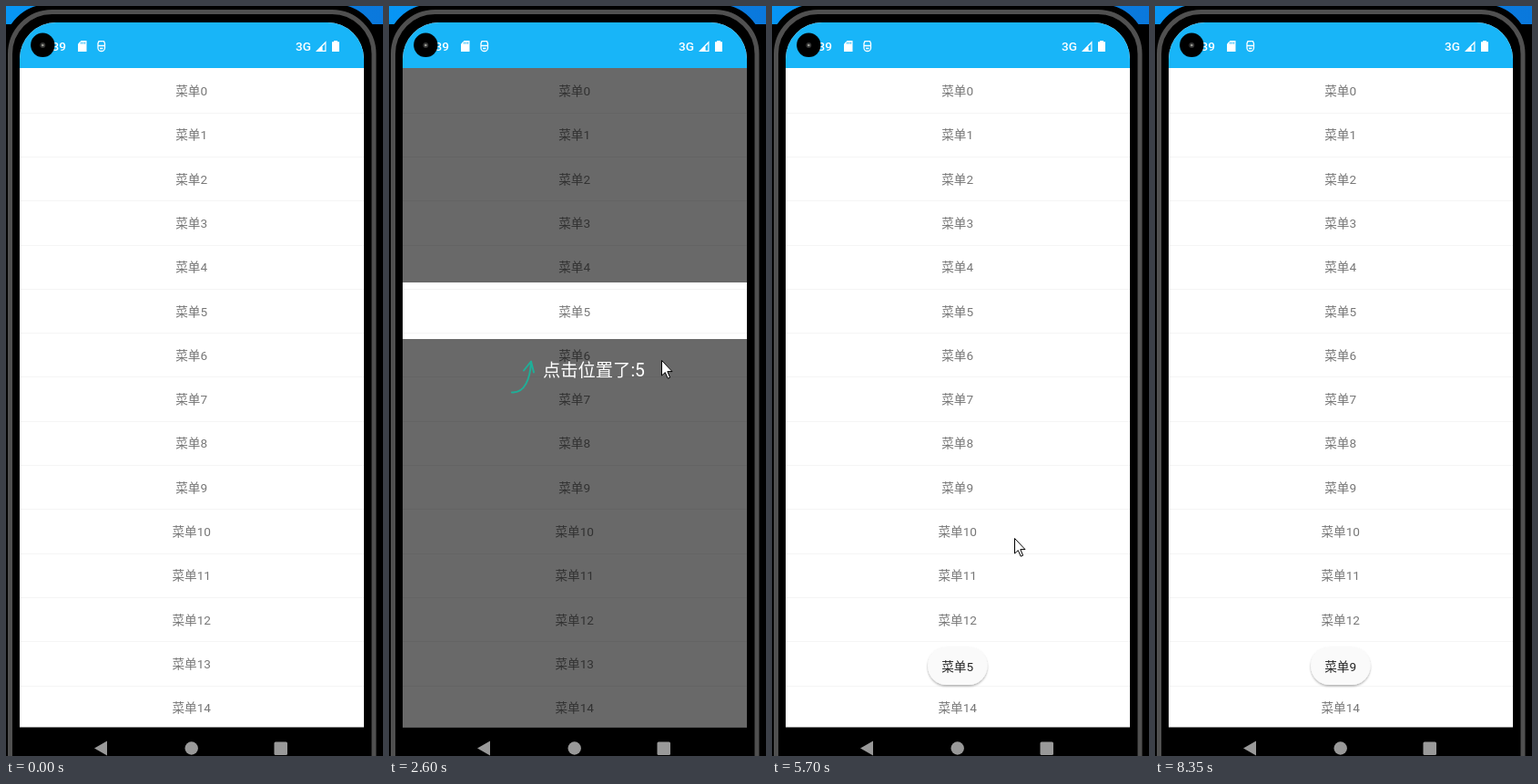
An HTML page that plays this animation: 414 px wide and 822 px high, repeating every 9300 ms.

```html
<!DOCTYPE html>
<html lang="zh-CN">
<head>
<meta charset="utf-8">
<title>菜单</title>
<style>
html, body { margin: 0; width: 100%; height: 100%; overflow: hidden; background: #000; }
svg { display: block; width: 100vw; height: 100vh; }
text { font-family: Roboto, "Noto Sans CJK SC", sans-serif; font-size: 13.6px; }
.row { fill: #777; text-anchor: middle; }
.status { fill: #fff; font-weight: 500; }
</style>
</head>
<body>
<svg viewBox="0 0 414 822">
  <defs>
    <linearGradient id="sky"><stop stop-color="#0796f5"/><stop offset="1" stop-color="#0a78dc"/></linearGradient>
    <clipPath id="screen"><path d="M15 790.5V58A40 40 0 0 1 55 18H353A40 40 0 0 1 393 58V790.5Z"/></clipPath>
    <clipPath id="rowClip"><rect id="rowBox" x="15" width="378" height="47.5"/></clipPath>
    <filter id="shadow" x="-20%" y="-20%" width="140%" height="150%"><feDropShadow dx="0" dy="1.5" stdDeviation="1.3" flood-opacity=".32"/></filter>
  </defs>

  <!-- phone body -->
  <rect width="414" height="20" fill="url(#sky)"/>
  <rect x="-3" y="-2" width="414" height="900" rx="50"/>
  <rect x="4.5" y="6.5" width="399.5" height="890" rx="46" fill="none" stroke="#505050" stroke-width="5"/>

  <g clip-path="url(#screen)">
    <rect x="15" y="18" width="378" height="773" fill="#fff"/>
    <rect x="15" y="18" width="378" height="50" fill="#18b5f8"/>
    <g id="rows"></g>
    <g clip-path="url(#rowClip)"><circle id="ripple"/></g>
    <g id="guide">
      <path id="dim" opacity=".59" fill-rule="evenodd"/>
      <g id="tip">
        <path d="M135 89C149 90 155 74 156 56M148 65L156 55L159 67" fill="none" stroke="#1fae98" stroke-width="2" stroke-linecap="round" stroke-linejoin="round"/>
        <text id="tipText" x="169" y="71" fill="#fff" style="font-size:19.3px"></text>
      </g>
    </g>
    <g id="toast">
      <rect x="171" y="702.5" width="65.5" height="41.5" rx="20.7" fill="#fafafa" filter="url(#shadow)"/>
      <text id="toastText" x="203.7" y="728.6" fill="#262626" text-anchor="middle"></text>
    </g>
  </g>

  <!-- status bar -->
  <text class="status" x="50.5" y="49">39</text>
  <circle cx="40.3" cy="42.8" r="13.2"/>
  <circle cx="40.3" cy="43" r="3" fill="#333"/>
  <circle cx="40.3" cy="43" r="1.3" fill="#a0a098"/>
  <path d="M82.5 38H88.5V50H79V41.5Z" fill="#fff"/>
  <path d="M82.6 39.5V41.6M84.6 39.5V41.6M86.6 39.5V41.6" stroke="#18b5f8"/>
  <path d="M102 38.7H107.500L108.500 41V46A3.75 3.5 0 0 1 101 46V41ZM101 43.500H108.500M103 46.500H106.500" fill="none" stroke="#fff" stroke-width="1.3"/>
  <text class="status" x="318" y="49">3G</text>
  <path d="M340 50L351.500 38.200V50Z" fill="#fff"/>
  <path d="M347.600 44.300L350.300 41.400V48.800H347.600Z" fill="#18b5f8"/>
  <path d="M360 39.300V38H364V39.300H366V50H358V39.300Z" fill="#fff"/>

  <!-- navigation bar -->
  <g fill="#999">
    <path d="M97 813.500L111 805.500V821.500Z"/>
    <circle cx="203.700" cy="813.500" r="7.200"/>
    <rect x="294.500" y="806.500" width="14.500" height="14.500" rx="1.500"/>
  </g>

  <path id="cursor" d="M.5 .5V17L4.300 13.600L7.200 20.200L9.600 19.200L6.800 12.600H12Z" fill="#fff" stroke="#000"/>
</svg>
<script>
const LOOP = 9300, STEP = 48.3, TRAVEL = 400, RIPPLE = 550, TOAST = 2000;
const $ = id => document.getElementById(id);
const set = (el, attrs) => { for (const k in attrs) el.setAttribute(k, attrs[k]); };
const clamp = v => Math.max(0, Math.min(1, v));
const ease = v => v * v * (3 - 2 * v);
const rowY = i => 93 + STEP * i;

// Pointer stops: arrival time, x, y. Each trip takes TRAVEL at most.
const stops = [
  [0, 364, 830], [450, 288, 459], [1100, 299, 331], [2180, 299, 388],
  [3000, 306, 466], [3500, 251, 371], [3650, 247, 331], [4100, 256, 498],
  [4970, 253, 519], [5700, 266, 583], [6680, 289, 651], [7400, 308, 525],
  [8350, 338, 824]
];
const taps = [{ row: 5, press: 1500, close: 3720 }, { row: 9, press: 5110, close: 7400 }];
for (const tap of taps) {
  tap.open = tap.press + 840;
  tap.toast = tap.close + 400;
}
const latest = (key, t) => taps.findLast(tap => t >= tap[key]) || taps[0];

$('rows').innerHTML = Array.from({ length: 15 }, (_, i) =>
  `<text class="row" x="203.700" y="${rowY(i) + 5}">菜单${i}</text>
   <rect x="15" y="${Math.round(rowY(i) + 23.7)}" width="378" height="1" fill="#f5f5f5"/>`).join('');

function pointer(t) {
  let [from, x, y] = stops[0];
  for (const [end, nextX, nextY] of stops.slice(1)) {
    const time = Math.min(TRAVEL, end - from);
    const k = ease(clamp((t - end + time) / time));
    x += (nextX - x) * k;
    y += (nextY - y) * k;
    from = end;
  }
  return [x, y];
}

function drawRipple(t) {
  const { row, press } = latest('press', t);
  const age = t - press;
  const [cx, cy] = pointer(press);
  set($('rowBox'), { y: rowY(row) - 23.3 });
  set($('ripple'), {
    cx, cy, r: 320 * clamp(age / 250),
    opacity: 0.12 * clamp((RIPPLE - age) / 300)
  });
}

function drawGuide(t) {
  const { row, open, close } = latest('open', t);
  const y = rowY(row), top = Math.round(y - 31.5);
  set($('guide'), { visibility: t >= open && t < close ? 'visible' : 'hidden' });
  set($('dim'), { d: `M15 68H393V791H15ZM15 ${top}H393v62H15Z` });
  set($('tip'), { transform: `translate(0 ${y})` });
  $('tipText').textContent = '点击位置了:' + row;
}

function drawToast(t) {
  const { row, toast } = latest('toast', t);
  const age = t - toast;
  set($('toast'), { opacity: clamp(age / 150) * clamp((TOAST + 300 - age) / 300) });
  $('toastText').textContent = '菜单' + row;
}

const start = performance.now();
function frame() {
  const t = (performance.now() - start) % LOOP;
  drawRipple(t);
  drawGuide(t);
  drawToast(t);
  set($('cursor'), { transform: `translate(${pointer(t).map(Math.round)})` });
  requestAnimationFrame(frame);
}
frame();
</script>
</body>
</html>
```
